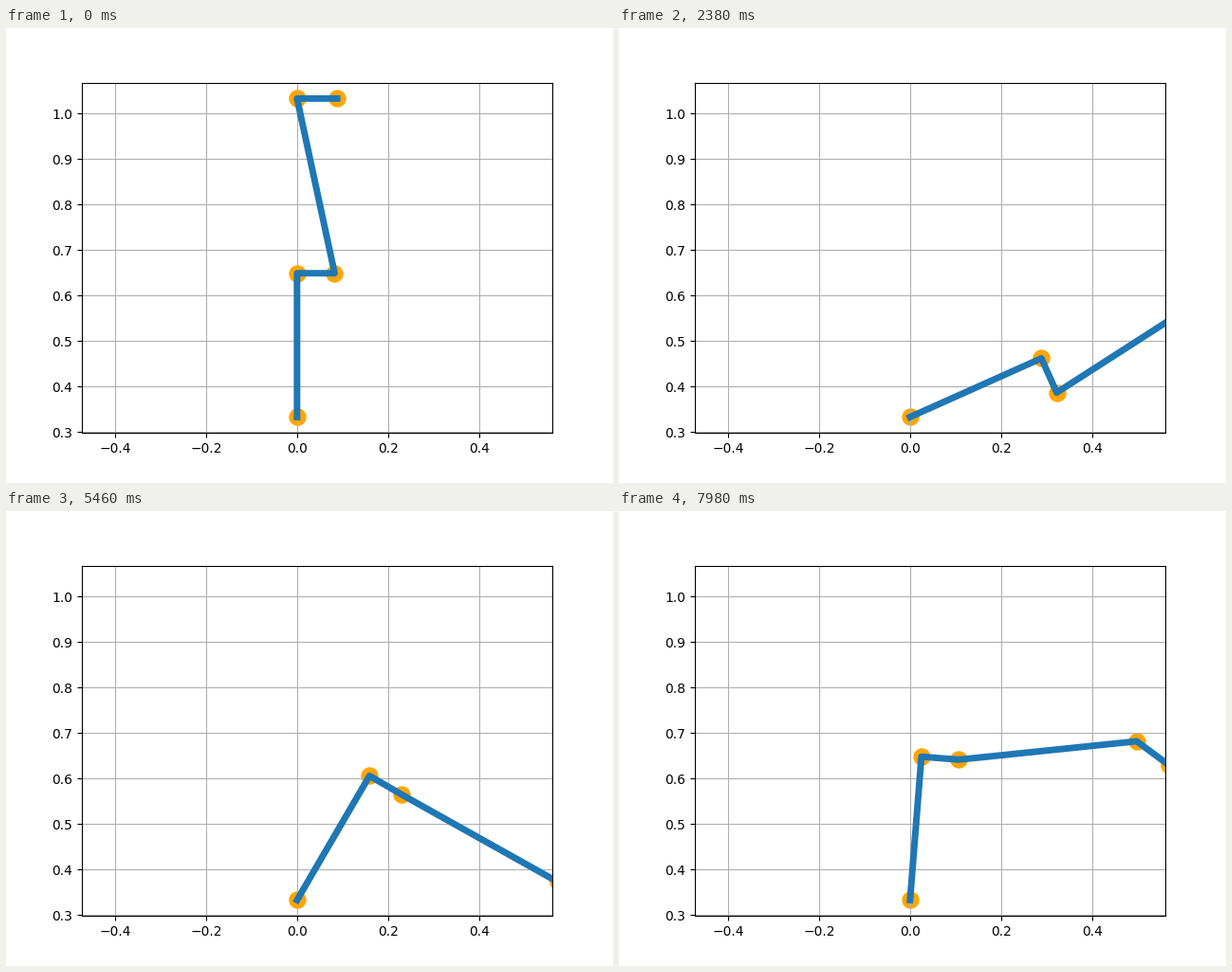
Recreate the animation shown at these times as a matplotlib script. Size 640 px wide and 480 px high, loop 8 s.

```python
import numpy as np
import matplotlib.pyplot as plt
from matplotlib.animation import FuncAnimation

FRAMES, STEP = 400, 20  # count, ms

# Arm geometry in metres
BASE = np.array([0.0, 0.333])
UPPER, OFFSET, FORE, HAND = 0.316, 0.0825, 0.384, 0.088

# Poses: (seconds, degrees clockwise, degrees per second)
SWING = [(0, 0, 0), (0.82, 11, 27), (1.48, 34.1, 37), (2.38, 65.9, 35),
         (3.14, 95.2, 37), (4.14, 108, 0), (4.82, 80.3, -81), (5.74, 18, -24)]
BEND = [(0, 0, 10), (0.5, 3.5, 0), (2.5, 3.5, 0), (4.6, 110, 0),
        (6.14, 93.8, -3), (7.98, 91.7, 0)]


def glide(poses, t):
    """Cubic motion through poses with given speeds."""
    time, angle, speed = np.array(poses, float).T
    i = np.clip(np.searchsorted(time, t, side="right") - 1, 0, len(time) - 2)
    h = time[i + 1] - time[i]
    s = (t - time[i]) / h
    return (angle[i] + (angle[i + 1] - angle[i]) * s ** 2 * (3 - 2 * s)
            + h * s * (1 - s) * (speed[i] * (1 - s) - speed[i + 1] * s))


def shoulder(t):
    settle_start, rest, tau = 5.74, 4.25, 0.57
    if t < settle_start:
        return glide(SWING, t)
    return rest + (SWING[-1][1] - rest) * np.exp((settle_start - t) / tau)


def wrist(t):
    return 8.45 * t - 0.0152 * t ** 3


def turn(degrees, x, y):
    a = np.radians(degrees)
    c, s = np.cos(a), np.sin(a)
    return np.array([x * c + y * s, y * c - x * s])


def joints(t):
    upper = shoulder(t)
    fore = upper + glide(BEND, t)
    hand = fore - wrist(t)
    links = [BASE, turn(upper, 0, UPPER), turn(upper, OFFSET, 0),
             turn(fore, -OFFSET, FORE), turn(hand, HAND, 0)]
    return np.cumsum(links, axis=0)


fig, ax = plt.subplots(figsize=(6.4, 4.8), dpi=100)
half_width = 0.77 * 496 / 369.6 / 2
ax.set_xlim(0.044 - half_width, 0.044 + half_width)
ax.set_ylim(0.298, 1.068)
ax.grid()
start = joints(0)
dots = ax.scatter(*start.T, s=150, color="orange")
arm, = ax.plot(*start.T, color="tab:blue", linewidth=5)


def update(i):
    points = joints(i * STEP / 1000)
    dots.set_offsets(points)
    arm.set_data(*points.T)
    return dots, arm


anim = FuncAnimation(fig, update, frames=FRAMES, interval=STEP,
                     repeat=True, repeat_delay=0)
plt.show()
```
